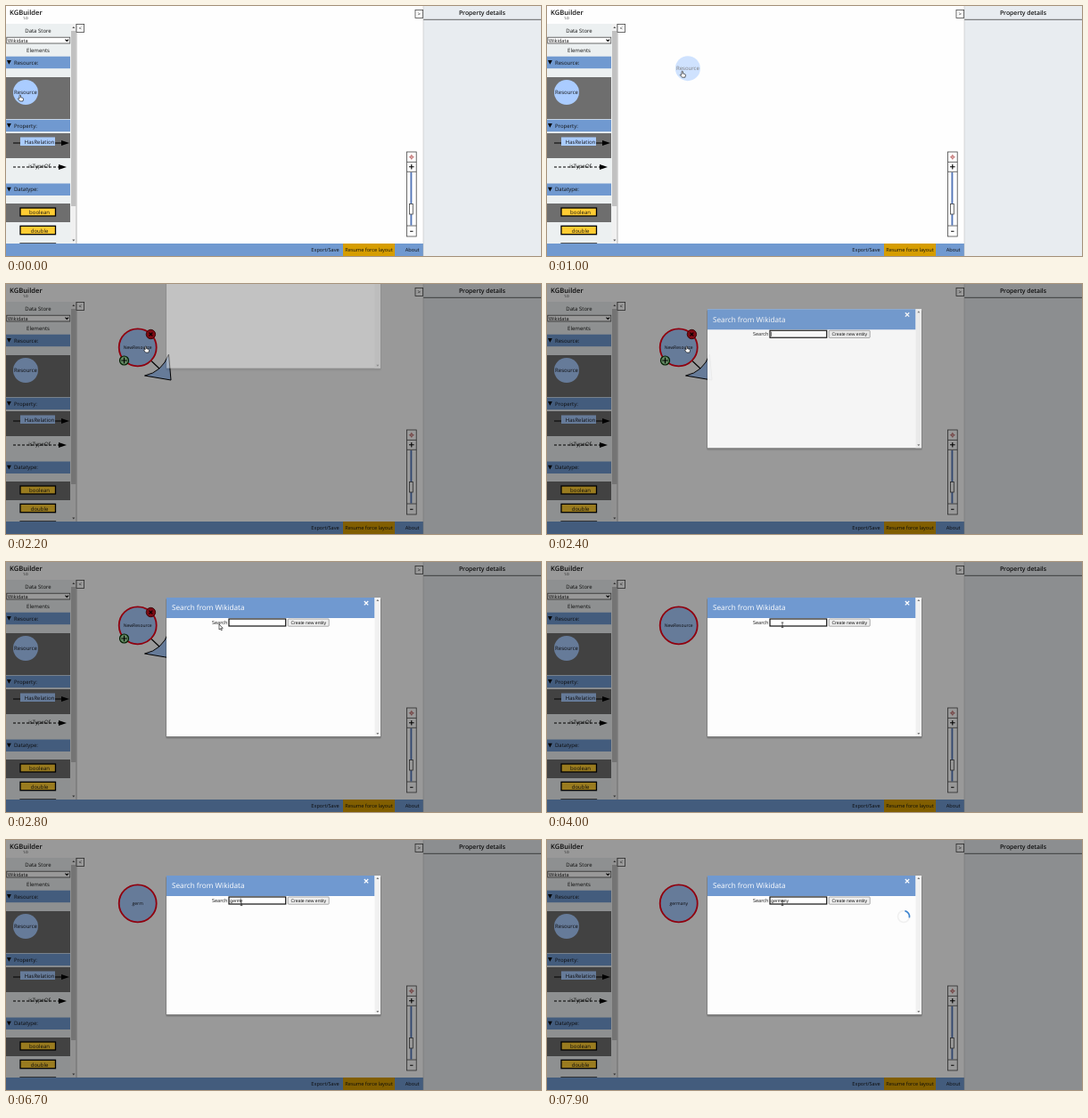
Animation, 600 px wide and 281 px high, one loop 8000 ms. Source, as an HTML page:

```html
<!DOCTYPE html>
<html lang="en">
<head>
<meta charset="utf-8">
<title>Graph editor</title>
<style>
html, body { margin: 0; width: 100%; height: 100%; overflow: hidden; background: #fefefe }
svg { display: block; width: 600px; height: 281px; text-rendering: geometricPrecision }
text { font: 6px "Open Sans", "Noto Sans", sans-serif; fill: #111 }
.mid { text-anchor: middle }
.ui { font: 5.1px "Liberation Sans", Arial, sans-serif }
.small { font-size: 5.6px }
.bar { fill: #7099d0 }
.dark { fill: #6e6e6e }
.pale { fill: #acf }
.type { fill: #fc3; stroke: #000; stroke-width: 1.3 }
.box { fill: #fff; stroke: #444; stroke-width: .8 }
.ink { fill: none; stroke: #000; stroke-width: 1.1 }
</style>
</head>
<body>
<svg viewBox="0 0 600 281">
  <rect width="600" height="281" fill="#fefefe"/>
  <text x="4" y="10" style="font-size:7.6px;font-weight:600">KGBuilder</text>
  <text x="19" y="15.3" style="font-size:4px">1.0</text>

  <!-- sidebar -->
  <rect y="20" width="79" height="247" fill="#ecf0f1"/>
  <text class="mid" x="36" y="30">Data Store</text>
  <rect class="box" x=".8" y="35.2" width="71" height="6.8"/>
  <text class="small" x="2" y="40.5">Wikidata</text>
  <path class="ink" d="M66.5 37.7l1.8 1.8 1.8-1.8" stroke-width=".8"/>
  <text class="mid" x="36" y="52">Elements</text>
  <g id="sections"></g>

  <rect class="dark" y="80" width="72" height="47"/>
  <circle class="pale" cx="22" cy="97" r="14"/>
  <text class="mid" x="22" y="98.5">Resource</text>

  <rect class="dark" y="143" width="72" height="28"/>
  <path class="ink" d="M8 154H63"/>
  <path d="M62 151l9 3-9 3z"/>
  <rect class="pale" x="16" y="147.5" width="39" height="9.5"/>
  <text class="mid" x="37.5" y="154.7">HasRelation</text>
  <path class="ink" d="M8 181H60" stroke-dasharray="3 2"/>
  <path d="M59 178l9 3-9 3z"/>
  <text class="mid" x="37.5" y="182">isTypeOf</text>

  <rect class="dark" y="222" width="72" height="21"/>
  <rect class="type" x="16" y="227" width="39.5" height="9"/>
  <text class="mid" x="37.5" y="234">boolean</text>
  <rect class="type" x="16" y="247.3" width="39.5" height="9.4"/>
  <text class="mid" x="37.5" y="254.7">double</text>
  <rect class="type" x="16" y="267" width="39.5" height="9"/>

  <rect x="72.5" y="20" width="6.5" height="247" fill="#f1f1f1"/>
  <rect x="73" y="28" width="5.3" height="197" fill="#c1c1c1"/>
  <path d="M74.3 25l1.5-2 1.5 2zM74.3 262.5l1.5 2 1.5-2z" fill="#555"/>
  <path d="M79 20V267" stroke="#999" stroke-width=".7"/>

  <!-- bottom bar and details panel -->
  <rect class="bar" y="267" width="468" height="14"/>
  <rect x="378" y="267" width="58" height="14" fill="#d69d00"/>
  <text class="mid small" x="358" y="276.4">Export/Save</text>
  <text class="mid small" x="407" y="276.4">Resume force layout</text>
  <text class="mid small" x="455.7" y="276.4">About</text>
  <rect x="468" width="132" height="281" fill="#e8ecf0"/>
  <path d="M468 15.3H600" stroke="#555" stroke-width=".9"/>
  <path d="M468 0V281" stroke="#bbb" stroke-width=".5"/>
  <text class="mid" x="534" y="10" style="font-size:6.8px;font-weight:600">Property details</text>

  <rect class="box" x="79" y="20.4" width="8.6" height="9"/>
  <text class="mid" x="83.3" y="27.2">&lt;</text>
  <rect class="box" x="459" y="4.4" width="8.6" height="9"/>
  <text class="mid" x="463.3" y="11.2">&gt;</text>

  <!-- zoom -->
  <rect class="box" x="449.4" y="164" width="10.8" height="95"/>
  <path d="M449.4 175.4h10.8M449.4 186.3h10.8M449.4 247h10.8" stroke="#444" stroke-width=".8"/>
  <path d="M454.8 166.8v6M451.8 169.8h6" stroke="#d99" stroke-width="1.1"/>
  <circle cx="454.8" cy="169.8" r="1.6" fill="none" stroke="#a55" stroke-width=".7"/>
  <path class="ink" d="M454.8 177.9v5.6M452 180.7h5.6M453.1 253.3h3.4"/>
  <path d="M454.4 187V246.6" stroke="#5577b8" stroke-width="1.9"/>
  <rect class="box" x="452.5" y="222.5" width="3.8" height="11.5"/>

  <!-- dragged copy -->
  <g id="ghost" opacity=".55">
    <circle class="pale" r="14"/>
    <text class="mid" y="1.5">Resource</text>
  </g>

  <!-- graph node -->
  <g id="node">
    <g id="arrow">
      <path class="ink" d="M163 86.5L173 96"/>
      <path class="pale" d="M182.5 79L185 108 155.5 103Q175 99 182.5 79z" stroke="#000"/>
    </g>
    <circle id="ring" class="pale" cx="147.7" cy="71.3" r="21"/>
    <text id="label" class="mid" x="147.7" y="73.4" style="font-size:5px"></text>
    <g id="tools">
      <circle cx="162.4" cy="56.5" r="5.2" fill="#d01020" stroke="#500" stroke-width=".9"/>
      <path class="ink" d="M160.5 54.6l3.8 3.8m0-3.8l-3.8 3.8"/>
      <circle cx="132.5" cy="86" r="5" fill="#9fdc9f" stroke="#030" stroke-width="1.2"/>
      <path class="ink" d="M132.5 82.8v6.4M129.3 86h6.4"/>
    </g>
  </g>

  <!-- dialog -->
  <rect id="shade" width="600" height="281" opacity=".4"/>
  <g id="modal">
    <rect x="179" y="41" width="242" height="158" rx="2" opacity=".1"/>
    <rect x="179.5" y="41" width="241" height="156.5" rx="1" opacity=".13"/>
    <rect x="180" y="40" width="240" height="156" fill="#fdfdfd"/>
    <rect class="bar" x="180" y="40" width="233.5" height="23"/>
    <rect x="413.5" y="40" width="6.5" height="156" fill="#f1f1f1"/>
    <path d="M415.3 44l1.5-2 1.5 2zM415.3 192l1.5 2 1.5-2z" fill="#777"/>
    <text x="186" y="54.4" style="font-size:8.2px;fill:#fff">Search from Wikidata</text>
    <path d="M401.8 44l4.4 4.4m0-4.4l-4.4 4.4" stroke="#fff" stroke-width="1.3"/>
    <text x="231" y="69.8" style="font-size:5.5px">Search</text>
    <rect x="250" y="64" width="63.7" height="8" fill="#fff" stroke="#111" stroke-width="1.2"/>
    <text id="query" class="ui" x="251.3" y="69.7"></text>
    <path id="caret" d="M0 65.4v5.2" stroke="#000" stroke-width=".6"/>
    <rect x="316.2" y="64" width="46" height="8.2" rx=".8" fill="#efefef" stroke="#767676" stroke-width=".6"/>
    <text class="ui mid" x="339.2" y="69.8">Create new entity</text>
    <g id="spinner" fill="none" stroke-width="1.6">
      <circle r="6.5" stroke="#f0f0f0"/>
      <path d="M-4.6-4.6A6.5 6.5 0 0 1 4.6-4.6" stroke="#3f86d0"/>
    </g>
  </g>

  <!-- pointers, hot spot at 0,0 -->
  <g id="pointer" stroke="#000" stroke-width=".6" stroke-linejoin="round">
    <path id="hand" fill="#fff" d="M-.9-2.6q.8-.8 1.4 0V-.3l2.4.7q.8.3.6 1.2L3 4H-.4L-2.6 1.3q0-1 1.7-.2z"/>
    <path id="cursor" fill="#fff" d="M0-2V4l1.4-1.2 1 2.1.9-.4-.9-2.1h1.8z"/>
    <path id="beam" fill="none" d="M-1.3-3H1.3M0-3V2.6M-1.3 2.6H1.3"/>
  </g>
</svg>
<script>
const $ = id => document.getElementById(id);
const show = (id, on) => { $(id).style.display = on ? '' : 'none'; };
const move = (id, x, y, turn = 0) =>
  $(id).setAttribute('transform', `translate(${x} ${y}) rotate(${turn})`);
const clamp = v => Math.min(1, Math.max(0, v));

const LOOP = 8000, STEP = 100;
const DROP = 1200, OPEN = 2200, TOOLS_OFF = 3300, CLICK = 4700;
const WORD = 'germany', TYPE = 6100, KEY = 200, SPIN = 7580;
// time, x, y of the pointer
const PATH = [[0, 16, 103], [300, 16, 103], [1100, 158, 75], [2100, 159, 75],
  [2200, 157, 73], [2400, 157, 73], [2800, 239, 72], [3200, 264, 71], [LOOP, 264, 71]];

$('sections').innerHTML = [['Resource:', 56.7], ['Property:', 127.7], ['Datatype:', 199.5]]
  .map(([name, y]) => `<rect class="bar" y="${y}" width="72" height="13.5"/>
    <path d="M1 ${y + 4.3}h4.8l-2.4 4.8z"/><text x="9" y="${y + 8.8}">${name}</text>`).join('');

function pointerAt(t) {
  const i = PATH.findIndex(k => k[0] > t);
  const [a, x, y] = PATH[i - 1], [b, x2, y2] = PATH[i];
  const u = (t - a) / (b - a), s = u * u * (3 - 2 * u);
  return [x + (x2 - x) * s, y + (y2 - y) * s];
}

// CSS "ease", cubic-bezier(.25, .1, .25, 1)
function ease(x) {
  let lo = 0, hi = 1, s = .5;
  for (let i = 0; i < 20; i++) {
    s = (lo + hi) / 2;
    if (.75 * s * (1 - s) + s ** 3 < x) lo = s; else hi = s;
  }
  return .3 * s * (1 - s) ** 2 + 3 * s * s * (1 - s) + s ** 3;
}

function draw(t) {
  const [x, y] = pointerAt(t), open = t >= OPEN;
  move('pointer', x, y);
  show('hand', t < 2500);
  show('cursor', t >= 2500 && x < 250);
  show('beam', x >= 250);

  show('ghost', t > 300 && t < DROP);
  move('ghost', x + 6, y - 6);

  const typed = WORD.slice(0, Math.max(0, Math.floor((t - TYPE) / KEY) + 1));
  show('node', t >= DROP);
  for (const id of ['tools', 'arrow']) show(id, open && t < TOOLS_OFF);
  $('ring').setAttribute('stroke', open ? '#f00018' : '#000');
  $('ring').setAttribute('stroke-width', open ? 1.8 : 1.3);
  $('label').textContent = typed || 'NewResource';

  show('shade', open);
  show('modal', open);
  if (!open) return;
  const p = ease(clamp((t - 2084) / 465));
  move('modal', 0, -171 * (1 - p));
  $('modal').setAttribute('opacity', p);

  $('query').textContent = typed;
  const lastKey = typed ? TYPE + (typed.length - 1) * KEY : t >= CLICK ? CLICK : OPEN;
  show('caret', (t - lastKey) % 1000 < 500);
  move('caret', 251.6 + (typed ? $('query').getComputedTextLength() : 0), 0);

  show('spinner', t >= SPIN);
  move('spinner', 400, 86, (t - SPIN) * .18);
}

function tick() {
  draw(Math.floor(performance.now() % LOOP / STEP) * STEP);
  requestAnimationFrame(tick);
}
tick();
</script>
</body>
</html>
```
